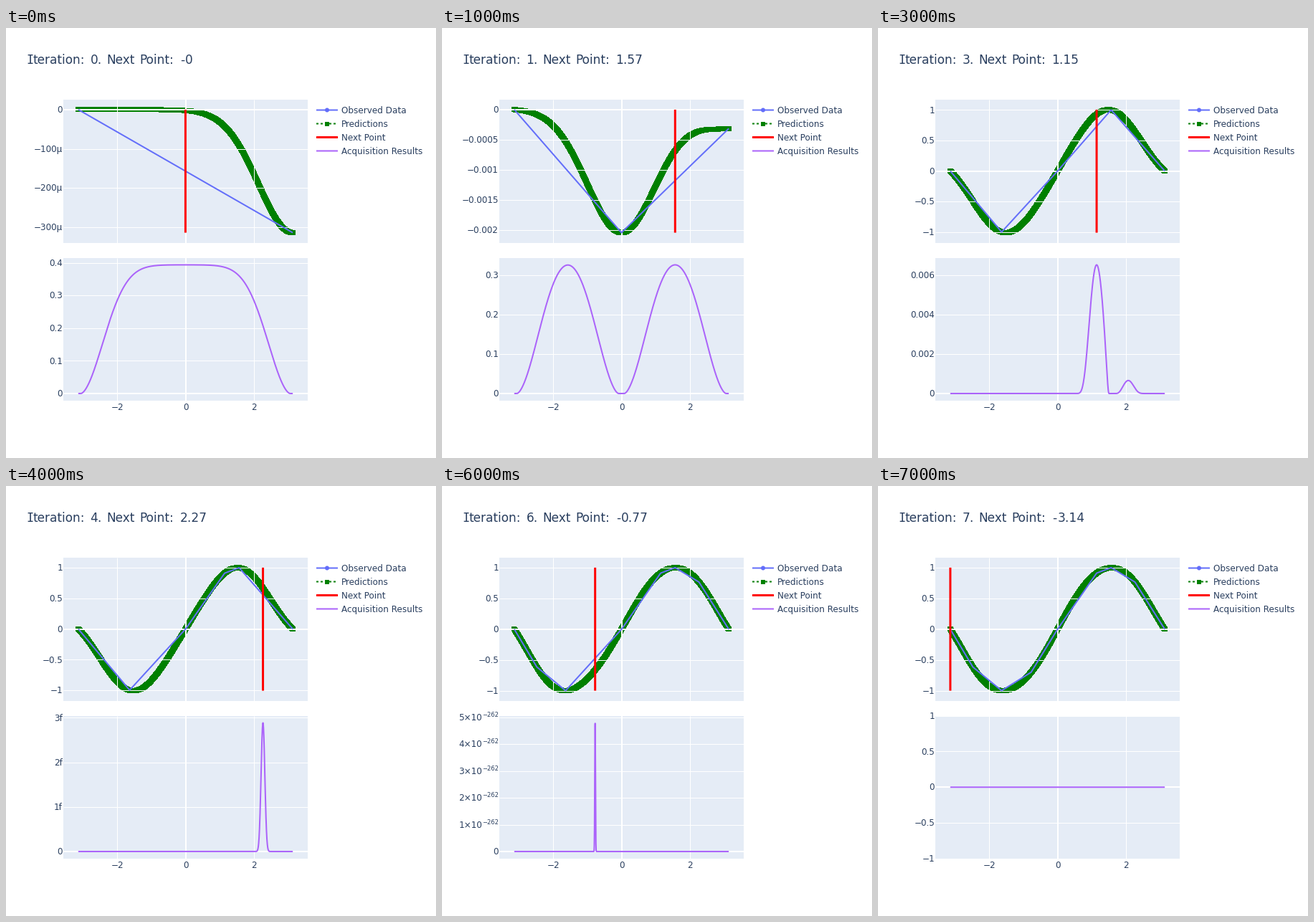
These frames come from a looping animation (600x600 px, 8000 ms). A matplotlib script:

```python
import math

import matplotlib.pyplot as plt
import numpy as np
from matplotlib.animation import FuncAnimation
from matplotlib.collections import PolyCollection
from matplotlib.patches import Circle, Rectangle

SIZE, DPI = 600, 100
PT = 72 / DPI
STEPS = 8
INK, PANEL = "#2a3f5f", "#e5ecf6"
BLUE, GREEN, RED, PURPLE = "#636efa", "#008000", "#ff0000", "#ab63fa"
LEFT, WIDTH, HEIGHT = 80, 341, 199.5
TOP_Y, LOW_Y = 100, 320.5
MID_X, X_SCALE = 250.5, 47.62
SI = {-15: "f", -12: "p", -9: "n", -6: "μ", -3: "m"}

# Bayesian optimisation of sin(x) with a unit RBF Gaussian process
STEP = 2 * math.pi / 19999
GRID = -math.pi + STEP * np.arange(20001)
erfc = np.vectorize(math.erfc, otypes=[float])


def kernel(a, b):
    return np.exp(-0.5 * (a[:, None] - b[None, :]) ** 2)


def predict(xs, ys):
    cov = kernel(xs, xs) + 1e-10 * np.eye(len(xs))
    cross = kernel(GRID, xs)
    mean = cross @ np.linalg.solve(cov, ys)
    var = 1 - np.sum(cross * np.linalg.solve(cov, cross.T).T, axis=1)
    return mean, var


def expected_gain(mean, spread, best, margin=0.01):
    spread = np.maximum(spread, 1e-12)
    gain = mean - best - margin
    z = np.clip(gain / spread, -60, 60)
    density = np.exp(-0.5 * z * z) / math.sqrt(2 * math.pi)
    value = gain * 0.5 * erfc(-z / math.sqrt(2)) + spread * density
    return np.where(value > 1e-300, value, 0.0)


def optimise():
    xs = GRID[[0, -1]]
    history = []
    for _ in range(STEPS):
        xs = np.sort(xs)
        ys = np.sin(xs)
        mean, var = predict(xs, ys)
        gain = expected_gain(mean, var, ys.max())
        point = GRID[np.argmax(gain)]
        history.append((xs, ys, mean, gain, point))
        xs = np.append(xs, point)
    return history


history = optimise()

fig = plt.figure(figsize=(SIZE / DPI, SIZE / DPI), dpi=DPI, facecolor="white")
ax = fig.add_axes([0, 0, 1, 1])


def to_x(v):
    return MID_X + X_SCALE * v


def line(x, y, color, width, snap=False, **style):
    ax.plot(x, y, color=color, lw=width * PT, snap=snap,
            solid_capstyle="butt", dash_capstyle="butt", **style)


def label(x, y, text, size=12, align="left", font="DejaVu Sans"):
    ax.text(x, y, text, fontsize=size * PT, family=font, color=INK,
            ha=align, va="baseline")


def tick_step(lo, hi):
    rough = (hi - lo) / (HEIGHT / 40 + 1)
    base = 10.0 ** math.floor(math.log10(rough))
    return base * next(m for m in (2, 5, 10) if rough / base <= m)


def number(v):
    return f"{round(v, 6):g}".replace("-", "−")


def tick_label(v, y, top):
    """Plain, SI-prefixed or power-of-ten label, by size of the axis."""
    y += 4.2
    power = math.floor(math.log10(top) + 0.01)
    if v == 0 or abs(power) <= 3:
        label(79, y, number(v), align="right")
    elif power >= -15:
        power = 3 * round((power - 1) / 3)
        label(79, y, number(v / 10.0 ** power) + SI[power], align="right")
    else:
        exponent = f"−{-power}"
        width = 8.4 * (0.838 + 0.636 * (len(exponent) - 1))
        label(79, y - 5, exponent, 8.4, "right")
        label(79 - width, y, number(v / 10.0 ** power) + "×10", align="right")


def panel(y0, lo, hi):
    """Draw background, grid and labels; return the value-to-pixel map."""
    def to_y(v):
        return y0 + HEIGHT * (hi - v) / (hi - lo)

    right, bottom = LEFT + WIDTH, y0 + HEIGHT
    ax.add_patch(Rectangle((LEFT, y0), WIDTH, HEIGHT, fc=PANEL, lw=0))
    for v in (-2, 2):
        line([to_x(v)] * 2, [y0, bottom], "white", 1, True)
    step = tick_step(lo, hi)
    first = math.ceil(lo / step - 1e-9)
    last = math.floor(hi / step + 1e-9)
    for k in range(first, last + 1):
        y = to_y(k * step)
        line([LEFT, right], [y, y], "white", 1 if k else 2, True)
        tick_label(k * step, y, max(abs(lo), abs(hi)))
    line([MID_X] * 2, [y0, bottom], "white", 2, True)
    return to_y


def padded(lo, hi, pad):
    if hi == lo:
        return -1, 1
    extra = (hi - lo) * pad / (HEIGHT - 2 * pad)
    return lo - extra, hi + extra


def squares(x, y):
    """Hard-edged band left by many overlapping square markers."""
    centers = np.unique(np.floor(np.column_stack([x, y])), axis=0)
    corners = np.array([(-3, -3), (4, -3), (4, 4), (-3, 4)])
    ax.add_collection(PolyCollection(centers[:, None] + corners, facecolors=GREEN,
                                     linewidths=0, antialiased=False))


def title(step, point):
    y, size = 50, 17
    value = f"{round(float(point), 2):g}"
    label(33.6, y, "I", size, "center", "DejaVu Sans Mono")
    words = [(37.2, "teration:"), (117.6, f"{step}."), (140.6, "Next"), (186.2, "Point:")]
    if value.startswith("-"):
        words += [(243.4, "-"), (250.3, value[1:])]
    else:
        words += [(242.6, value)]
    for x, word in words:
        label(x, y, word, size)


def legend():
    rows = [("Observed Data", BLUE, 2), ("Predictions", GREEN, 2),
            ("Next Point", RED, 3), ("Acquisition Results", PURPLE, 2)]
    for i, (name, color, width) in enumerate(rows):
        y = 114.5 + 19 * i
        dash = {"ls": (0, (1.5, 1.5))} if color == GREEN else {}
        line([433, 463], [y, y], color, width, **dash)
        label(468, y + 4.2, name)
    ax.add_patch(Circle((448, 114.5), 3, fc=BLUE, lw=0))
    ax.add_patch(Rectangle((445, 130.5), 6, 6, fc=GREEN, lw=0))


def draw(step):
    xs, ys, mean, gain, point = history[step]
    ax.clear()
    ax.set(xlim=(0, SIZE), ylim=(SIZE, 0))
    ax.axis("off")

    title(step, point)
    legend()

    lo, hi = mean.min(), mean.max()
    to_y = panel(TOP_Y, *padded(lo, hi, 13.9))
    line(to_x(xs), to_y(ys), BLUE, 2)
    squares(to_x(GRID), to_y(mean))
    line([to_x(point)] * 2, [to_y(lo), to_y(hi)], RED, 3)

    to_y = panel(LOW_Y, *padded(gain.min(), gain.max(), HEIGHT / 20))
    line(to_x(GRID[::10]), to_y(gain[::10]), PURPLE, 2)
    for v in (-2, 0, 2):
        label(to_x(v), 533, number(v), align="center")
    return []


anim = FuncAnimation(fig, draw, frames=STEPS, interval=1000, repeat=True, repeat_delay=0)
plt.show()
```
